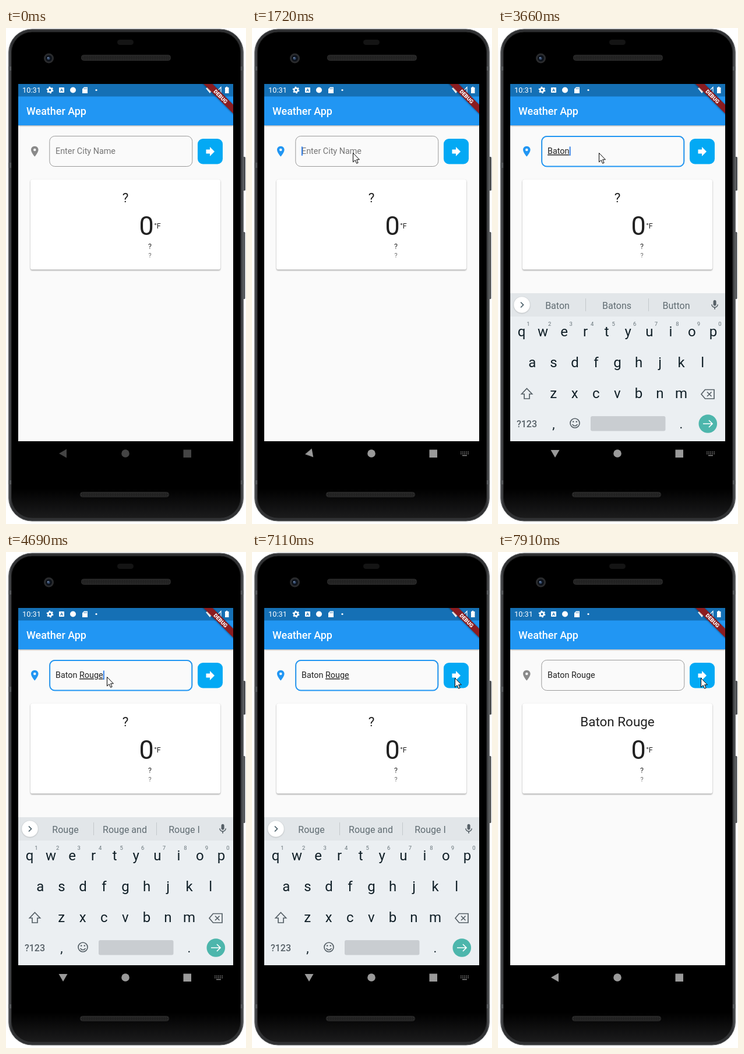
Write an HTML page that moves like this. It is 412 px wide and 851 px high and loops after 8 s.

```html
<!DOCTYPE html>
<html lang="en">
<head>
<meta charset="utf-8">
<title>Weather App</title>
<style>
html, body { margin: 0; width: 100%; height: 100%; overflow: hidden; background: #fff; }
svg { display: block; width: 412px; height: 851px; font-family: Roboto, sans-serif; }
.mid { text-anchor: middle; }
.anim, .step { animation: 8s linear infinite; }
.step { animation-timing-function: step-end; }

#cursor { animation-name: cursor; }
@keyframes cursor {
  0%, 4.875% { transform: translate(310px, 851px); }
  6.5% { transform: translate(250px, 700px); }
  7.6% { transform: translate(234px, 560px); }
  8.8% { transform: translate(216px, 425px); }
  10.4% { transform: translate(190px, 265px); }
  12%, 14% { transform: translate(173px, 217px); }
  14.25%, 67.8% { transform: translate(173px, 214px); animation-timing-function: cubic-bezier(.4, 0, .5, 1); }
  72.875% { transform: translate(330px, 222px); }
  75% { transform: translate(360px, 190px); animation-timing-function: ease-out; }
  77.5%, 88.874% { transform: translate(350px, 216px); }
  88.875%, 100% { transform: translate(348px, 216px); }
}
#click { animation-name: click; }
@keyframes click {
  0%, 18.125%, 78.25%, 100% { opacity: 0; }
  16.25%, 77.5% { opacity: 1; }
}
#caret { animation-name: caret; }
@keyframes caret {
  0%, 27.125%, 64.75%, 77.25%, 100% { opacity: 0; }
  20.5%, 33.25%, 71% { opacity: 1; }
}
#pin { animation-name: pin; }
@keyframes pin {
  0%, 96.25%, 100% { fill: #8a8a8a; }
  20.5% { fill: #2196f3; }
}
#focus { animation-name: focus; }
@keyframes focus {
  0%, 21.6% { opacity: 0; }
  23.6%, 97.1% { opacity: 1; }
  98.6%, 100% { opacity: 0; }
}
#halo { animation-name: halo; transform-origin: 350.5px 212px; }
@keyframes halo {
  0%, 96.1% { opacity: 0; transform: scale(.8); }
  96.3% { opacity: 1; transform: scale(.9); }
  97% { opacity: 1; transform: scale(1); }
  98.6%, 100% { opacity: 0; transform: scale(1); }
}
#keyboard { animation-name: keyboard; }
@keyframes keyboard {
  0%, 21.6% { transform: translateY(38px); opacity: 0; animation-timing-function: cubic-bezier(.33, .67, .67, 1); }
  24.2%, 96.25% { transform: none; opacity: 1; animation-timing-function: cubic-bezier(.33, 0, .67, .33); }
  98.6%, 100% { transform: translateY(38px); opacity: 0; }
}
#nav { animation-name: nav; }
@keyframes nav { 0% { fill: #444; } 20.25%, 100% { fill: #9a9a9a; } }
#back { animation-name: back; transform-origin: 98px 730px; }
@keyframes back {
  0%, 20.5% { transform: none; }
  21.5% { transform: rotate(-10deg); }
  24.2%, 96.25% { transform: rotate(-90deg); }
  97% { transform: rotate(-65deg); }
  98.7%, 100% { transform: none; }
}
#imeSwitch { animation-name: ime; }
@keyframes ime { 0%, 96.5%, 100% { opacity: 0; } 20.5% { opacity: 1; } }
</style>
</head>
<body>
<svg viewBox="0 0 412 851">
  <defs>
    <linearGradient id="rim" x2="1" y2="0">
      <stop stop-color="#55575a"/><stop offset=".012" stop-color="#303133"/>
      <stop offset=".988" stop-color="#303133"/><stop offset="1" stop-color="#5c5e60"/>
    </linearGradient>
    <linearGradient id="glass" x2="0" y2="1">
      <stop offset=".94" stop-color="#000"/><stop offset="1" stop-color="#1b1b1c"/>
    </linearGradient>
    <pattern id="mesh" width="3" height="3" patternUnits="userSpaceOnUse">
      <path fill="#1d1d1d" d="M0 0h3v3H0z"/><path fill="#353535" d="M0 0h1.5v1.5H0z"/>
    </pattern>
    <clipPath id="screen"><path d="M21 96h369v613H21z"/></clipPath>
    <clipPath id="window"><path d="M21 96h369v651H21z"/></clipPath>
    <filter id="soft" x="-10%" y="-10%" width="120%" height="130%"><feGaussianBlur stdDeviation="1.2"/></filter>
    <path id="mic" d="M12 14c1.66 0 3-1.34 3-3V5c0-1.66-1.34-3-3-3S9 3.34 9 5v6c0 1.66 1.34 3 3 3zm5.3-3c0 3-2.54 5.1-5.3 5.1S6.7 14 6.7 11H5c0 3.41 2.72 6.23 6 6.72V21h2v-3.28c3.28-.49 6-3.3 6-6.72z"/>
  </defs>

  <!-- Phone body -->
  <g fill="#4b4d4f">
    <rect x="405" y="221" width="6" height="58" rx="1.5"/>
    <rect x="405" y="350" width="5.5" height="115" rx="1.5"/>
    <rect x="404" y="582" width="4" height="40" rx="1"/>
  </g>
  <rect x="4.5" y="2" width="403" height="844" rx="40" fill="url(#rim)" stroke="#66686a"/>
  <path d="M4 66h5v7H4zM403 66h5v7h-5zM4 231h5v9H4zM4 776h5v7H4zM403 776h5v7h-5z" fill="#55585a"/>
  <rect x="9.5" y="7" width="393" height="833" rx="35" fill="url(#glass)" stroke="#171717"/>
  <rect x="191" y="20" width="28" height="9" rx="4.5" fill="#141414"/>
  <rect x="129.5" y="46.5" width="153" height="9" rx="4" fill="url(#mesh)" stroke="#303030"/>
  <rect x="127.5" y="796.5" width="152" height="8" rx="4" fill="url(#mesh)" stroke="#303030"/>
  <circle cx="73.500" cy="52" r="8.500" fill="#2a2b2d"/>
  <circle cx="73.500" cy="52" r="5.500" fill="#0c1119"/>
  <circle cx="73" cy="52" r="2.500" fill="#33496b"/>
  <circle cx="72" cy="51" r="1" fill="#8ea2bd"/>

  <g clip-path="url(#screen)">
    <path d="M21 96h369v613H21z" fill="#fafafa"/>
    <path d="M21 110h369v58H21z" fill="#000" opacity=".35" filter="url(#soft)"/>
    <path d="M21 96h369v71H21z" fill="#2196f3"/>
    <path d="M21 96h369v21.500H21z" fill="#1570b5"/>
    <text x="35" y="149" font-size="17.960" font-weight="500" fill="#fff">Weather App</text>

    <!-- Status bar -->
    <g fill="#fff">
      <text x="28" y="111.300" font-size="12.800">10:31</text>
      <circle cx="75.500" cy="106.500" r="3.200" fill="none" stroke="#fff" stroke-width="2.600"/>
      <circle cx="75.500" cy="106.500" r="5" fill="none" stroke="#fff" stroke-width="1.800" stroke-dasharray="2.620"/>
      <rect x="91" y="102" width="9" height="9" rx="1"/>
      <text x="95.500" y="109.300" class="mid" font-size="7.500" font-weight="700" fill="#1570b5">A</text>
      <circle cx="115" cy="106.500" r="5"/>
      <path d="M134 101.500h6v10.500h-9v-7.500z"/>
      <path d="M134.200 103v2.200M136.200 103v2.200M138.200 103v2.200" stroke="#1570b5" stroke-width=".8"/>
      <circle cx="155" cy="106.500" r="1.600"/>
      <path d="M343 103.500q7-5.500 14 0l-7 8.500z"/>
      <path d="M369 101.500v10h-9.500z" fill="none" stroke="#fff" stroke-width="1.200"/>
      <path d="M376 102h1.700v-1.300h2.600v1.300h2.200v10H376z"/>
    </g>

    <!-- Debug ribbon -->
    <g transform="translate(390 96) rotate(45)">
      <rect x="-38" y="25" width="76" height="12" fill="#000" opacity=".35" filter="url(#soft)"/>
      <rect x="-38" y="25.100" width="76" height="10.800" fill="#8b1c20"/>
      <text y="33.800" class="mid" font-size="9.200" font-weight="900" fill="#fff">DEBUG</text>
    </g>

    <!-- Search row -->
    <path id="pin" class="step" transform="translate(38.500 201) scale(.898)" d="M12 2C8.130 2 5 5.130 5 9c0 5.250 7 13 7 13s7-7.750 7-13c0-3.870-3.130-7-7-7zm0 9.500a2.500 2.500 0 010-5 2.500 2.500 0 010 5z"/>
    <rect x="74.800" y="185.500" width="245" height="52" rx="9" fill="none" stroke="#999"/>
    <rect id="focus" class="anim" x="75.200" y="186" width="244" height="51.500" rx="8.500" fill="#fafafa" stroke="#2196f3" stroke-width="1.900"/>
    <text id="hint" x="85" y="216" font-size="14.370" fill="#757575">Enter City Name</text>
    <text id="entry" x="85" y="216" font-size="14.370" fill="#222"><tspan id="done"></tspan><tspan id="word" text-decoration="underline"></tspan></text>
    <rect id="caret" class="step" x="85" y="203.500" width="1.800" height="15.500" fill="#2979e8"/>
    <circle id="halo" class="anim" cx="350.500" cy="212" r="30.500" fill="#e7e7e7"/>
    <rect x="329" y="190" width="43" height="43.500" rx="9" fill="#03a9f4"/>
    <path d="M343.500 208.500h6.500v-4.500l8 8-8 8v-4.500h-6.500z" fill="#fff"/>

    <!-- Weather card -->
    <rect x="42" y="261" width="326" height="155" rx="3.600" fill="#000" opacity=".35" filter="url(#soft)"/>
    <rect x="42" y="260" width="326" height="154.500" rx="3.600" fill="#fff"/>
    <g class="mid" fill="#212121">
      <text id="city" x="205" y="298.500" font-size="22.440">?</text>
      <text x="241" y="354.500" font-size="44.900">0</text>
      <text x="260" y="343.500" font-size="12.570">°F</text>
      <text x="247" y="379" font-size="12.570">?</text>
      <text x="247" y="394" font-size="10.800" fill="#666">?</text>
    </g>
  </g>

  <!-- Navigation bar -->
  <g id="nav" class="step">
    <path id="back" class="anim" d="M91 730l13-7.500v15z"/>
    <circle cx="205" cy="730" r="6.800"/>
    <path d="M304.500 723.500h13.500v13.500h-13.500z"/>
    <g id="imeSwitch" class="step" fill="none" stroke="#8a8a8a" stroke-width="1.500">
      <path d="M358 727.500h14M358 730.500h14" stroke-dasharray="1.600 1.500"/>
      <path d="M361 733.500h8"/>
    </g>
  </g>

  <g clip-path="url(#window)">
    <g id="keyboard" class="anim" fill="#101f27">
      <path d="M21 455h369v254H21z" fill="#ebeff2"/>
      <path d="M21 455h369v40H21z" fill="#e2e6e9"/>
      <circle cx="41" cy="475.700" r="14" fill="#000" opacity=".2" filter="url(#soft)"/>
      <circle cx="41" cy="475" r="13.800" fill="#fff"/>
      <path id="chevron" fill="none" stroke="#455a64" stroke-width="1.700"/>
      <use href="#mic" transform="translate(362 465) scale(.84)" fill="#566067"/>

      <g id="tools" fill="none" stroke="#616b71" stroke-width="1.700">
        <circle cx="89.500" cy="473" r="5"/><path d="M93 476.500l6 6"/>
        <path d="M140 468.500h10q2 0 2 2v6l-5 5h-7q-2 0-2-2v-9q0-2 2-2zM152 476h-5v5.500M141.500 475q2 3.500 5 2"/>
        <path d="M142 472h1.500M147 472h1.500"/>
        <text x="198" y="479.500" class="mid" font-size="12.500" font-weight="900" letter-spacing=".6" fill="#616b71" stroke="none">GIF</text>
        <rect x="246" y="468" width="15" height="15" fill="#616b71" stroke="none"/>
        <path d="M286.500 465v21" stroke="#cbd0d3" stroke-width="1"/>
        <path d="M311.500 475h3M317.700 475h3M324 475h3" stroke-width="3"/>
      </g>
      <g id="suggestions" class="mid" font-size="16" fill="#606c72">
        <path d="M150.500 464v22M258.500 464v22" stroke="#c3c8cb"/>
        <text x="102" y="481.500"></text><text x="204" y="481.500"></text><text x="306" y="481.500"></text>
      </g>

      <g id="keys" class="mid" font-size="24"></g>
      <g fill="none" stroke="#566067" stroke-width="1.700">
        <path d="M49.500 618.500l9 9.500h-4.500v8h-9v-8h-4.500z"/>
        <path d="M355.500 620.500h15.500v15.500h-15.500l-6.500-7.750zM359 624.500l7.500 7.500M366.500 624.500l-7.500 7.500"/>
        <circle cx="132" cy="678" r="8"/><path d="M127.500 680q4.500 5.500 9 0"/>
      </g>
      <circle cx="129.200" cy="675.500" r="1.300" fill="#566067"/>
      <circle cx="134.800" cy="675.500" r="1.300" fill="#566067"/>
      <text x="49.500" y="684.500" class="mid" font-size="16" font-weight="500" fill="#566067">?123</text>
      <text x="95.500" y="687" class="mid" font-size="22">,</text>
      <text x="314.500" y="687" class="mid" font-size="22">.</text>
      <rect x="159" y="666" width="128.500" height="25.500" rx="3" fill="#c9cdd1"/>
      <circle cx="360.300" cy="679" r="15.800" fill="#4db6ac"/>
      <path d="M352 679h15.500M362 673l6 6-6 6" fill="none" stroke="#fff" stroke-width="1.700"/>
    </g>
  </g>

  <g id="cursor" class="anim">
    <circle id="click" class="step" r="12" fill="#ff0" fill-opacity=".47"/>
    <path d="M.5.500V16l3.600-3.400 2.500 5.700 2.500-1.100-2.500-5.400h4.800z" fill="#fff" stroke="#000"/>
  </g>
</svg>

<script>
const LOOP = 8000;
const $ = id => document.getElementById(id);
const slots = [...$('suggestions').querySelectorAll('text')];

function addText(x, y, text, attrs = {}) {
  const node = document.createElementNS('http://www.w3.org/2000/svg', 'text');
  for (const [key, value] of Object.entries({ x, y, ...attrs })) node.setAttribute(key, value);
  node.textContent = text;
  $('keys').append(node);
}

const rows = [['qwertyuiop', 40.5, 529], ['asdfghjkl', 58.8, 582], ['zxcvbnm', 95.2, 635]];
rows.forEach(([letters, left, y], row) => [...letters].forEach((letter, i) => {
  const x = left + i * 36.55;
  addText(x, y, letter);
  if (row === 0) addText(x + 11.5, 511, (i + 1) % 10, { 'font-size': 9.5, fill: '#68747a' });
}));

// time, committed text, composing word, suggestions
const typing = [
  [0, '', '', ''],
  [2950, '', 'B', 'B|Be|But'],
  [3090, '', 'Ba', 'Ba|Back|Bad'],
  [3370, '', 'Bat', 'Bat|Bath|Battery'],
  [3500, '', 'Bato', 'Bato|Baton|Bats'],
  [3660, '', 'Baton', 'Baton|Batons|Button'],
  [3970, 'Baton ', '', 'Rouge|and|is'],
  [3990, 'Baton ', 'R', 'R|Rouge|Re'],
  [4150, 'Baton ', 'Ro', 'Ro|Rouge|Room'],
  [4260, 'Baton ', 'Rou', 'Rou|Rouge|Rough'],
  [4510, 'Baton ', 'Roug', 'Roug|Rouge|Rough'],
  [4680, 'Baton ', 'Rouge', 'Rouge|Rouge and|Rouge I'],
  [7700, 'Baton Rouge', '', 'Rouge|Rouge and|Rouge I']
];

let shown;
function show(state) {
  if (state === shown) return;
  shown = state;
  const [time, done, word, words] = state;
  $('done').textContent = done.replace(/ /g, '\u00a0');
  $('word').textContent = word;
  $('hint').style.display = done || word ? 'none' : '';
  $('caret').setAttribute('x', 85 + (done || word ? $('entry').getComputedTextLength() + .3 : 0));
  $('tools').style.display = words ? 'none' : '';
  $('suggestions').style.display = words ? '' : 'none';
  $('chevron').setAttribute('d', words ? 'M39 470.500l4.500 4.500-4.500 4.500' : 'M43 470.500l-4.500 4.500 4.500 4.500');
  const parts = words.split('|');
  slots.forEach((slot, i) => slot.textContent = parts[i] || '');
  $('city').textContent = time >= 7700 ? done : '?';
}

let start;
function tick(now) {
  start ??= now;
  const t = (now - start) % LOOP;
  show(typing.findLast(state => state[0] <= t));
  requestAnimationFrame(tick);
}
show(typing[0]);
requestAnimationFrame(tick);
</script>
</body>
</html>
```
